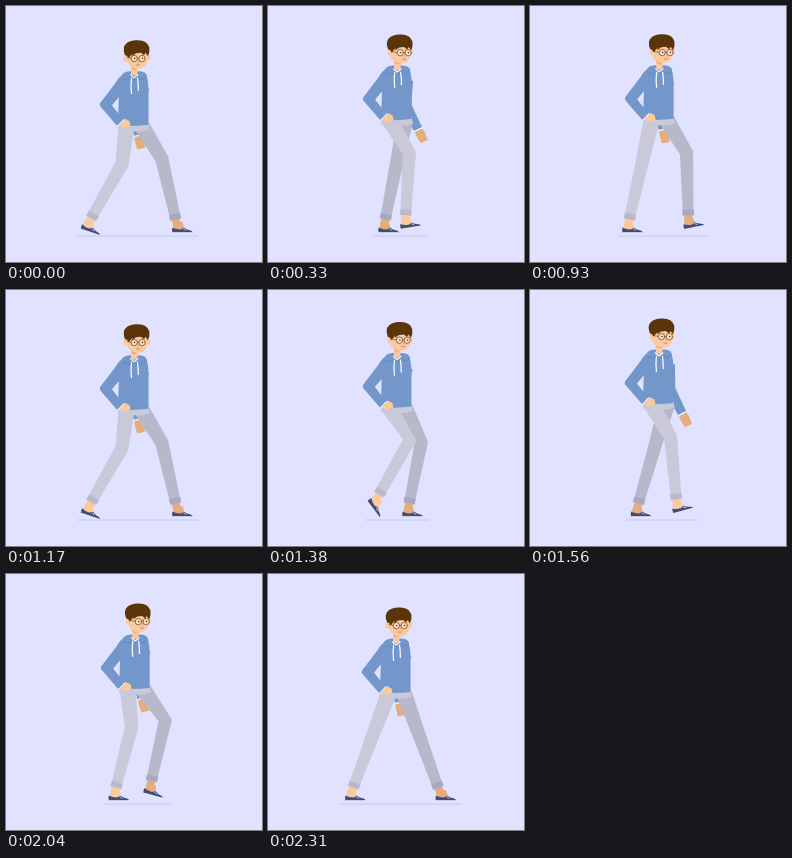
Animation, 256 px wide and 256 px high, one loop 2.34 s. Source, as an HTML page with a canvas:

```html
<!DOCTYPE html>
<html lang="en">
<head>
<meta charset="utf-8">
<title>Walk cycle</title>
<style>
  html, body { margin: 0; width: 100%; height: 100%; overflow: hidden; background: #e0e2ff; }
  canvas { display: block; width: 256px; height: 256px; }
</style>
</head>
<body>
<canvas id="stage"></canvas>
<script>
const canvas = document.getElementById('stage');
const ctx = canvas.getContext('2d');
const scale = window.devicePixelRatio || 1;
canvas.width = canvas.height = 256 * scale;

const LOOP = 2340, STRIDE = 1170, STEP = 30, TAU = Math.PI * 2;
const C = {
  bg: '#e0e2ff', hoodie: '#7397ca', hood: '#6689bd',
  skin: '#fbca9c', skinDark: '#e3ad7c', hair: '#5a3509', frame: '#76503b',
  near: '#c9c9d9', far: '#b7b8ca', nearCuff: '#b9b9cb', farCuff: '#a8a9c0',
  shoe: '#424d78', white: '#f6f7ff', shadow: '#c9cbe2'
};
const THIGH = 38, SHIN = 70;

// Swing progress, foot pitch in degrees, ankle lift
const SWING = [
  [0, 0, 0], [0.06, 0, 0], [0.1, 18, 2], [0.3, 46, 8], [0.47, 53, 10],
  [0.67, -10, 4], [0.8, -17, 4], [1, 0, 0]
];

function swingPose(p) {
  if (p >= 1) return { pitch: 0, lift: 0 };
  const i = SWING.findIndex(k => k[0] > p);
  const a = SWING[i - 1], b = SWING[i];
  const f = (p - a[0]) / (b[0] - a[0]);
  const mix = n => a[n] + (b[n] - a[n]) * f;
  return { pitch: mix(1) * Math.PI / 180, lift: mix(2) };
}

function shape(color, ...points) {
  ctx.fillStyle = color;
  ctx.beginPath();
  points.forEach(([x, y]) => ctx.lineTo(x, y));
  ctx.closePath();
  ctx.fill();
}

function path(color, d) {
  ctx.fillStyle = color;
  ctx.fill(new Path2D(d));
}

function stroke(color, width, d) {
  ctx.strokeStyle = color;
  ctx.lineWidth = width;
  ctx.lineCap = ctx.lineJoin = 'round';
  ctx.stroke(new Path2D(d));
}

function oval(color, x, y, rx, ry = rx) {
  ctx.fillStyle = color;
  ctx.beginPath();
  ctx.ellipse(x, y, rx, ry, 0, 0, TAU);
  ctx.fill();
}

// Tapered band through the points
function limb(color, points, widths) {
  const left = [], right = [];
  points.forEach(([x, y], i) => {
    const a = points[Math.max(i - 1, 0)];
    const b = points[Math.min(i + 1, points.length - 1)];
    const len = Math.hypot(b[0] - a[0], b[1] - a[1]);
    const nx = -(b[1] - a[1]) / len * widths[i] / 2;
    const ny = (b[0] - a[0]) / len * widths[i] / 2;
    left.push([x + nx, y + ny]);
    right.unshift([x - nx, y - ny]);
  });
  shape(color, ...left, ...right);
}

// Middle joint of a two-bone chain; side picks the bend direction
function joint(a, b, l1, l2, side) {
  const dx = b[0] - a[0], dy = b[1] - a[1];
  const d = Math.hypot(dx, dy);
  const along = d >= l1 + l2 ? d * l1 / (l1 + l2) : (l1 * l1 - l2 * l2 + d * d) / (2 * d);
  const out = d >= l1 + l2 ? 0 : Math.sqrt(Math.max(0, l1 * l1 - along * along)) * side;
  return [a[0] + (dx * along + dy * out) / d, a[1] + (dy * along - dx * out) / d];
}

const between = (a, b, f) => [a[0] + (b[0] - a[0]) * f, a[1] + (b[1] - a[1]) * f];

// Ankle position for a phase where 0 is the rearmost point
function footPose(phase, center, reach) {
  const turn = phase - Math.floor(phase);
  const { pitch, lift } = swingPose(turn * 2);
  return {
    x: center - reach * Math.cos(turn * TAU) - 8 * Math.sin(pitch),
    y: 221 - lift,
    pitch
  };
}

function shoe(foot, skin) {
  ctx.save();
  ctx.translate(foot.x, foot.y);
  ctx.rotate(foot.pitch);
  path(skin, 'M-2 -5 H6 L8 2 L3 4 H-3Z');
  path(C.shoe, 'M-4 0.5 Q-1 2.5 4 2.5 L7.5 0.8 Q10 3 14 3.5 Q16 4 16 5.5 L-4 5.5 Q-5 3 -4 0.5Z');
  stroke(C.white, 0.6, 'M-3.5 5.6 H15.5');
  stroke(C.white, 0.7, 'M7 2 L9 3.2');
  ctx.restore();
}

function leg(hip, foot, color, cuff, skin) {
  const ankle = [foot.x + 1, foot.y];
  const knee = joint(hip, ankle, THIGH, SHIN, 1);
  const hem = between(knee, ankle, 0.89);
  const fold = between(knee, ankle, 0.81);
  limb(skin, [fold, between(knee, ankle, 1.03)], [8, 8]);
  shoe(foot, skin);
  limb(color, [hip, knee, hem], [16, 13.5, 10.5]);
  limb(cuff, [fold, hem], [11.4, 11.4]);
}

function farArm(angle, dx, dy) {
  const shoulder = [138 + dx, 79 + dy];
  const wrist = [142 - 11.5 * Math.cos(angle), 128 + dy];
  const elbow = joint(shoulder, wrist, 25, 27, -1);
  const hand = [0.95, 1.16, 1.5].map(f => between(elbow, wrist, f));
  limb(C.skinDark, hand, [7, 9.5, 8]);
  limb(C.hoodie, [shoulder, elbow, wrist], [12, 11, 9]);
  limb(C.white, [between(elbow, wrist, 0.98), between(elbow, wrist, 1.03)], [9, 9]);
}

function torso() {
  path(C.near, 'M112 115 H142.5 L143.5 122 Q136 125 129 124 L112 123Z');
  path(C.hoodie, 'M117 67 Q128 63 140 67 Q142.5 73 142.5 84 V117.5 Q128 119.5 112 118 L113 82 Z');
  path(C.skin, 'M113 118.5 L119 111.5 L123.5 114 L124.5 119 L117 120.5Z');
  path(C.hoodie, 'M118 67 Q113 69 110 75 L94 96 Q93 98 95 100 L111 118.5 L117 112 L106 98 L117 85Z');
  stroke(C.white, 1.1, 'M112 118.6 L117.6 112.4');
  path(C.bg, 'M111.8 91.5 L111.8 105 L106.5 98.3Z');
}

function hoodAndNeck() {
  path(C.hoodie, 'M115 70 Q116 64.5 124 64 H133 Q141 64 141 70 Q137 74 129 73 Q121 75 115 70Z');
  path(C.skin, 'M125 57 H131.5 V67 Q128.5 70 125 67Z');
  path(C.skinDark, 'M125 60 L131.5 60.5 V62 Q128 64 125 61Z');
  stroke(C.hood, 1, 'M117 71.5 Q122 74 127.5 71 Q134 74 140 70');
  stroke(C.white, 1.2, 'M124.5 67.5 L128 70.5 L132 67.5');
  stroke(C.white, 1.3, 'M125.5 71 Q124.5 79 125.5 86 M131.5 71 Q132.5 77 132.3 83');
}

function head(turn) {
  const shift = turn * 3;
  oval(C.skin, 119.8 + turn * 1.5, 51, 2.5, 3.3);
  oval(C.skin, 142 - turn * 0.5, 50.5, 2.2, 3);
  path(C.skin, 'M120.5 43 H142 V51 Q141 61.5 131.5 62 Q122 61 120.5 52Z');

  ctx.save();
  ctx.translate(shift, 0);
  for (const x of [128.2, 136]) {
    oval('#f9dcc5', x, 51.2, 3.1);
    ctx.strokeStyle = C.frame;
    ctx.lineWidth = 0.8;
    ctx.beginPath();
    ctx.arc(x, 51.2, 3.2, 0, TAU);
    ctx.stroke();
    oval(C.hair, x + 0.4, 51, 0.8);
  }
  stroke(C.frame, 0.8, 'M131.4 51 H132.8');
  stroke('#e5a078', 0.8, 'M132.4 53 L133 55 H132');
  stroke('#c56f5d', 0.8, 'M130.5 57.6 Q132 58.3 133.5 57.4');
  ctx.restore();
  stroke(C.frame, 0.7, `M${121 + turn} 50 L${125 + shift} 51`);

  path(C.hair, 'M119 48 Q116 40 120 36.5 Q124 32.5 132 33 Q141 33 143.3 40 Q144 45 142 49 ' +
    'L139.5 45.5 L138 48 L135 45.5 L130 46 L126 49 L126.5 46.5 L122.5 51 L121 48.5Z');
}

function draw(time) {
  const phase = (time + 60) / STRIDE;
  const bob = -1.2 + 3.5 * Math.cos(2 * TAU * (time - 70) / STRIDE);
  const turn = 0.5 - 0.5 * Math.cos(2 * TAU * (time - 10) / STRIDE);
  const sway = turn * 1.2;
  const nearFoot = footPose(phase, 117, 36);
  const farFoot = footPose(phase + 0.5, 134, 38.5);

  ctx.setTransform(scale, 0, 0, scale, 0, 0);
  ctx.fillStyle = C.bg;
  ctx.fillRect(0, 0, 256, 256);

  const start = Math.min(nearFoot.x, farFoot.x) - 9;
  const end = Math.max(nearFoot.x, farFoot.x) + 22;
  stroke(C.shadow, 1, `M${start} 230 H${end}`);

  farArm(TAU * (time + 110) / STRIDE, sway, bob);
  leg([136 + sway, 119 + bob], farFoot, C.far, C.farCuff, C.skinDark);
  leg([120.5 + sway, 119 + bob], nearFoot, C.near, C.nearCuff, C.skin);

  ctx.translate(sway, bob);
  torso();
  hoodAndNeck();
  head(turn);
}

function tick() {
  const time = performance.now() % LOOP;
  draw(Math.floor(time / STEP) * STEP);
  requestAnimationFrame(tick);
}
tick();
</script>
</body>
</html>
```
